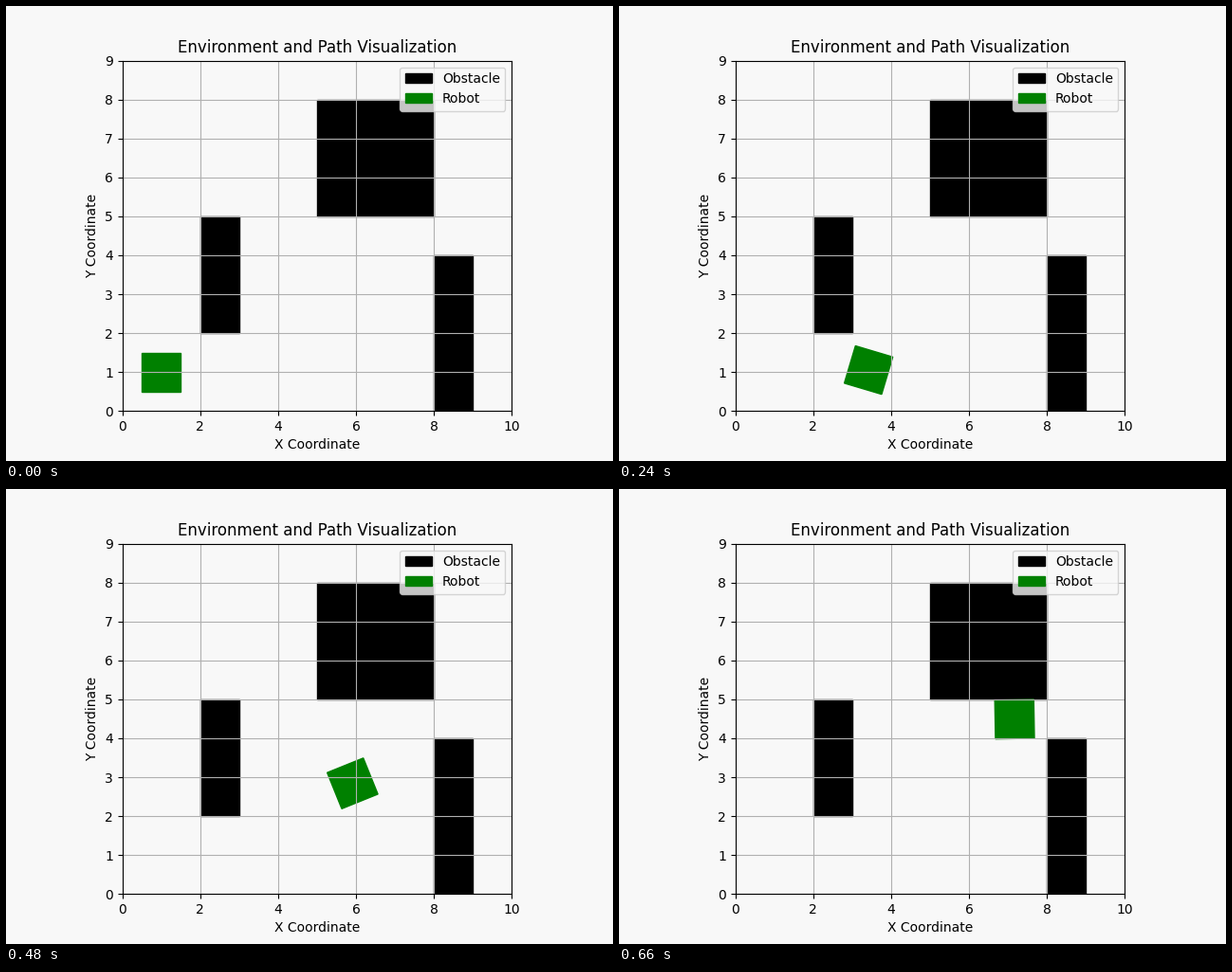
Animation of 640 by 480 pixels, one loop 0.72 s. Source, as a matplotlib script:

```python
import matplotlib.pyplot as plt
import numpy as np
from matplotlib.animation import FuncAnimation
from matplotlib.patches import Rectangle

BACKGROUND = "#f8f8f8"
STEPS = 12
INTERVAL = 60

# Key poses of the robot: centre x, centre y, angle in degrees
KEY_STEPS = np.array([0, 2, 4, 6, 8, 9, 11])
KEY_POSES = np.array([
    (1.00, 1.00, 0),
    (1.64, 1.00, -21.5),
    (3.42, 1.05, -16.6),
    (4.76, 2.39, -27.8),
    (5.91, 2.84, 22),
    (6.885, 2.76, 20),
    (7.17, 4.49, 1),
])
SLOPES = np.gradient(KEY_POSES, KEY_STEPS, axis=0)

# x, y, width, height
OBSTACLES = [(2, 2, 1, 3), (5, 5, 3, 3), (8, 0, 1, 4)]

plt.rcParams["font.family"] = "DejaVu Sans"
fig, ax = plt.subplots(figsize=(6.4, 4.8), dpi=100, facecolor=BACKGROUND)
ax.set(facecolor=BACKGROUND, xlim=(0, 10), ylim=(0, 9), aspect="equal",
       title="Environment and Path Visualization",
       xlabel="X Coordinate", ylabel="Y Coordinate")
ax.grid(True)

for i, (x, y, w, h) in enumerate(OBSTACLES):
    label = "Obstacle" if i == 0 else None
    ax.add_patch(Rectangle((x, y), w, h, color="black", label=label))

robot = Rectangle((0.5, 0.5), 1, 1, rotation_point="center",
                  color="green", label="Robot")
ax.add_patch(robot)
ax.legend(loc="upper right", facecolor=BACKGROUND)


def pose(step):
    """Centre and angle on a smooth Hermite curve through the key poses."""
    i = min(np.searchsorted(KEY_STEPS, step, side="right"),
            len(KEY_STEPS) - 1) - 1
    span = KEY_STEPS[i + 1] - KEY_STEPS[i]
    t = (step - KEY_STEPS[i]) / span
    ease = t * t * (3 - 2 * t)
    bend = t * (1 - t) * ((1 - t) * SLOPES[i] - t * SLOPES[i + 1])
    return (1 - ease) * KEY_POSES[i] + ease * KEY_POSES[i + 1] + span * bend


def update(step):
    x, y, angle = pose(step)
    robot.set_xy((x - 0.5, y - 0.5))
    robot.set_angle(angle)
    return [robot]


anim = FuncAnimation(fig, update, frames=STEPS, interval=INTERVAL,
                     repeat=True, repeat_delay=0)
plt.show()
```
